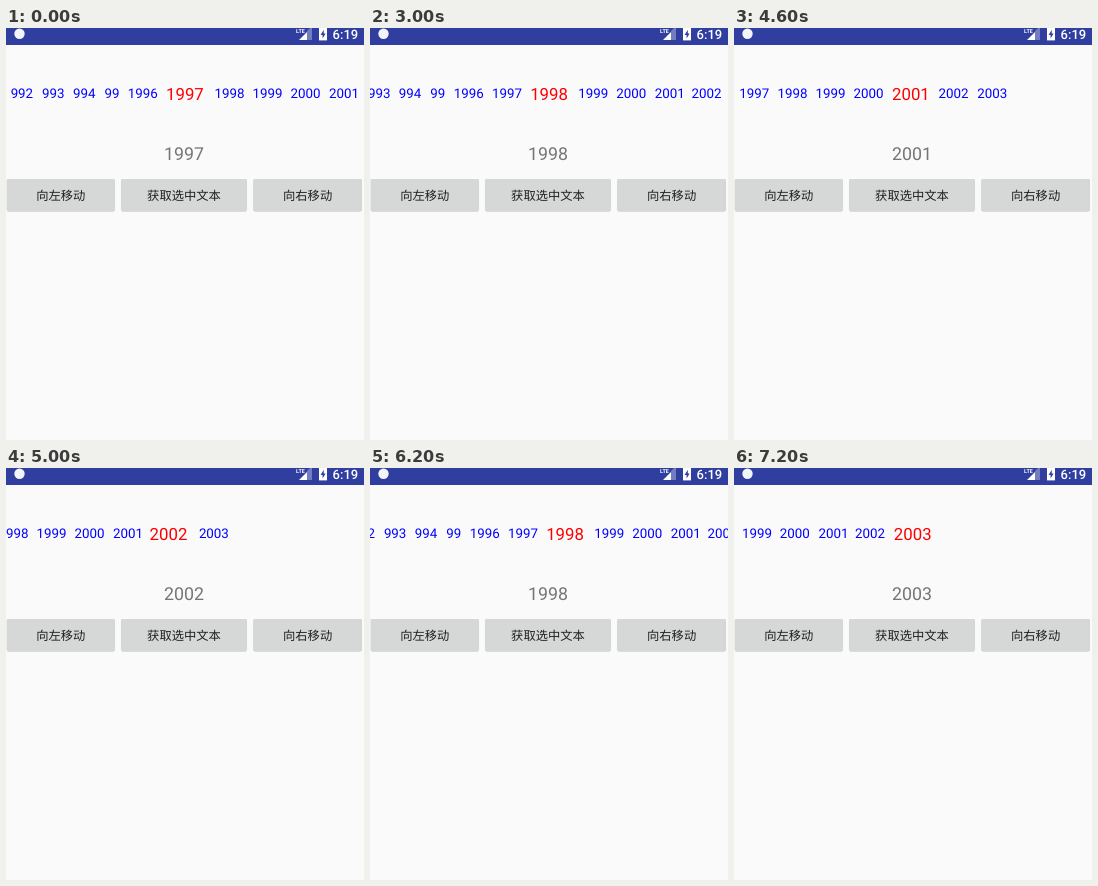
Write an HTML page that moves like this. It is 358 px wide and 412 px high and loops after 8000 ms.

```html
<!DOCTYPE html>
<html lang="zh-CN">
<head>
<meta charset="utf-8">
<title>Year picker</title>
<style>
html, body { margin: 0; width: 100%; height: 100%; overflow: hidden; background: #fafafa; }
svg { display: block; width: 358px; height: 412px; }
text { font-family: Roboto, sans-serif; text-rendering: geometricPrecision; white-space: pre; }
.button rect { fill: #d6d7d7; filter: drop-shadow(0 .9px .5px rgba(0, 0, 0, .24)); }
.button.pressed rect { fill: #d2d3d3; filter: drop-shadow(0 1px 1.8px rgba(0, 0, 0, .4)); }
.button text { font: 12.3px "Noto Sans CJK SC", "Noto Sans CJK", sans-serif; fill: #1f1f1f; text-anchor: middle; }
#value { font-size: 17.8px; fill: #757575; text-anchor: middle; }
#clock { font-size: 13px; font-weight: 500; fill: #fff; }
#network { font-size: 5.4px; font-weight: 700; fill: #fff; }
</style>
</head>
<body>
<svg viewBox="0 0 358 412">
  <rect width="358" height="412" fill="#fafafa"/>
  <rect width="358" height="17" fill="#303f9f"/>
  <circle cx="13.5" cy="5.8" r="5.2" fill="#f4f5fa"/>
  <path d="M306 -2V12H301V3Z" fill="#fff" opacity=".32"/>
  <path d="M301 4V12H293Z" fill="#fff"/>
  <text id="network" x="290" y="5">LTE</text>
  <path d="M313 0H321V12.4H313Z" fill="#fff"/>
  <path d="M317.8 1.8L314.6 7H316.6V10.6L319.6 5.6H317.8Z" fill="#303f9f"/>
  <text id="clock" x="326.6" y="11.3">6:19</text>
  <g id="years"></g>
  <text id="value" x="178.1" y="132.4"></text>
  <g id="buttons"></g>
</svg>
<script>
const NS = 'http://www.w3.org/2000/svg';
const LOOP = 8000, STEP = 100;
const SMALL = 13.35, LARGE = 16.8;
const GAP = 9.8, SELECTED_GAP = 12.7;
const MIDDLE = 177.9;
const CELL = 44;
const BASE = 8; // index of 1998, where the drag begins

const years = ['990', '991', '992', '993', '994', '99'];
for (let y = 1996; y <= 2003; y++) years.push(String(y));

const el = (name, attrs, parent, text = '') => {
  const node = document.createElementNS(NS, name);
  for (const key in attrs) node.setAttribute(key, attrs[key]);
  node.textContent = text;
  parent.appendChild(node);
  return node;
};

const pen = document.createElement('canvas').getContext('2d');
pen.font = '100px Roboto, sans-serif';
const inkWidths = years.map(s => {
  const m = pen.measureText(s);
  return (m.actualBoundingBoxLeft + m.actualBoundingBoxRight) / 100;
});

const yearsBox = document.getElementById('years');
const labels = years.map(s => el('text', {}, yearsBox, s));
const value = document.getElementById('value');

const buttons = [
  ['向左移动', 0.8, 108], ['获取选中文本', 115.2, 125.6], ['向右移动', 247.4, 108.4]
].map(([name, x, width]) => {
  const g = el('g', { class: 'button' }, document.getElementById('buttons'));
  el('rect', { x, y: 151, width, height: 32.5, rx: 1.8 }, g);
  el('text', { x: x + width / 2, y: 171.6 }, g, name);
  return g;
});

// Finger travel in px, [time, distance]
const PEAK = 5000, TROUGH = 6100, RELEASE = 7200;
const drag = [
  [4100, 0], [4200, 27], [4600, 135], [5000, 192], [5300, 146], [5700, 40],
  [6000, -15], [6200, -16], [6400, 30], [6600, 122], [6800, 199], [7000, 223], [7200, 226]
];

function travel(t) {
  let i = 0;
  while (i < drag.length - 2 && t >= drag[i + 1][0]) i++;
  const at = k => drag[Math.max(0, Math.min(drag.length - 1, k))];
  const slope = k => (at(k + 1)[1] - at(k - 1)[1]) / (at(k + 1)[0] - at(k - 1)[0]);
  const [t0, a] = at(i), [t1, b] = at(i + 1);
  const d = t1 - t0, p = (t - t0) / d, q = 1 - p;
  return q * q * (1 + 2 * p) * a + p * p * (3 - 2 * p) * b
    + d * p * q * (q * slope(i) - p * slope(i + 1));
}

// The selection moves on only after a full cell of travel in one direction.
function dragState(t) {
  const u = travel(t), cells = u / CELL;
  let n;
  if (t <= PEAK) n = Math.floor(cells);
  else if (t <= TROUGH) n = Math.min(4, Math.ceil(cells));
  else n = Math.max(0, Math.floor(cells));
  return { index: BASE + n, offset: n * CELL - u };
}

function stateAt(t) {
  if (t >= RELEASE) return { index: BASE + 5, offset: 0 };
  if (t >= 4200) return dragState(t);
  const index = t < 900 ? 7 : t < 2100 ? 6 : t < 2900 ? 7 : 8;
  return { index, offset: 0 };
}

function place(i, x, selected) {
  const s = labels[i].style;
  labels[i].setAttribute('x', x.toFixed(2));
  labels[i].setAttribute('y', selected ? 71.8 : 70.3);
  s.fontSize = (selected ? LARGE : SMALL) + 'px';
  s.fill = selected ? '#f00' : '#00f';
}

function render(t) {
  const { index, offset } = stateAt(t);
  const width = inkWidths[index] * LARGE;
  const start = MIDDLE - width / 2 + offset;
  place(index, start, true);
  let x = start;
  for (let i = index - 1; i >= 0; i--) {
    x -= inkWidths[i] * SMALL + GAP;
    place(i, x, false);
  }
  x = start + width + SELECTED_GAP;
  for (let i = index + 1; i < years.length; i++) {
    place(i, x, false);
    x += inkWidths[i] * SMALL + GAP;
  }
  value.textContent = years[index];
  const leftDown = (t >= 2000 && t < 2100) || (t >= 2800 && t < 3000);
  buttons[0].classList.toggle('pressed', leftDown);
  buttons[2].classList.toggle('pressed', t >= 800 && t < 900);
}

const begin = performance.now();
let shown = -1;
function tick() {
  const t = Math.floor(((performance.now() - begin) % LOOP) / STEP) * STEP;
  if (t !== shown) render(shown = t);
  requestAnimationFrame(tick);
}
render(0);
tick();
</script>
</body>
</html>
```
